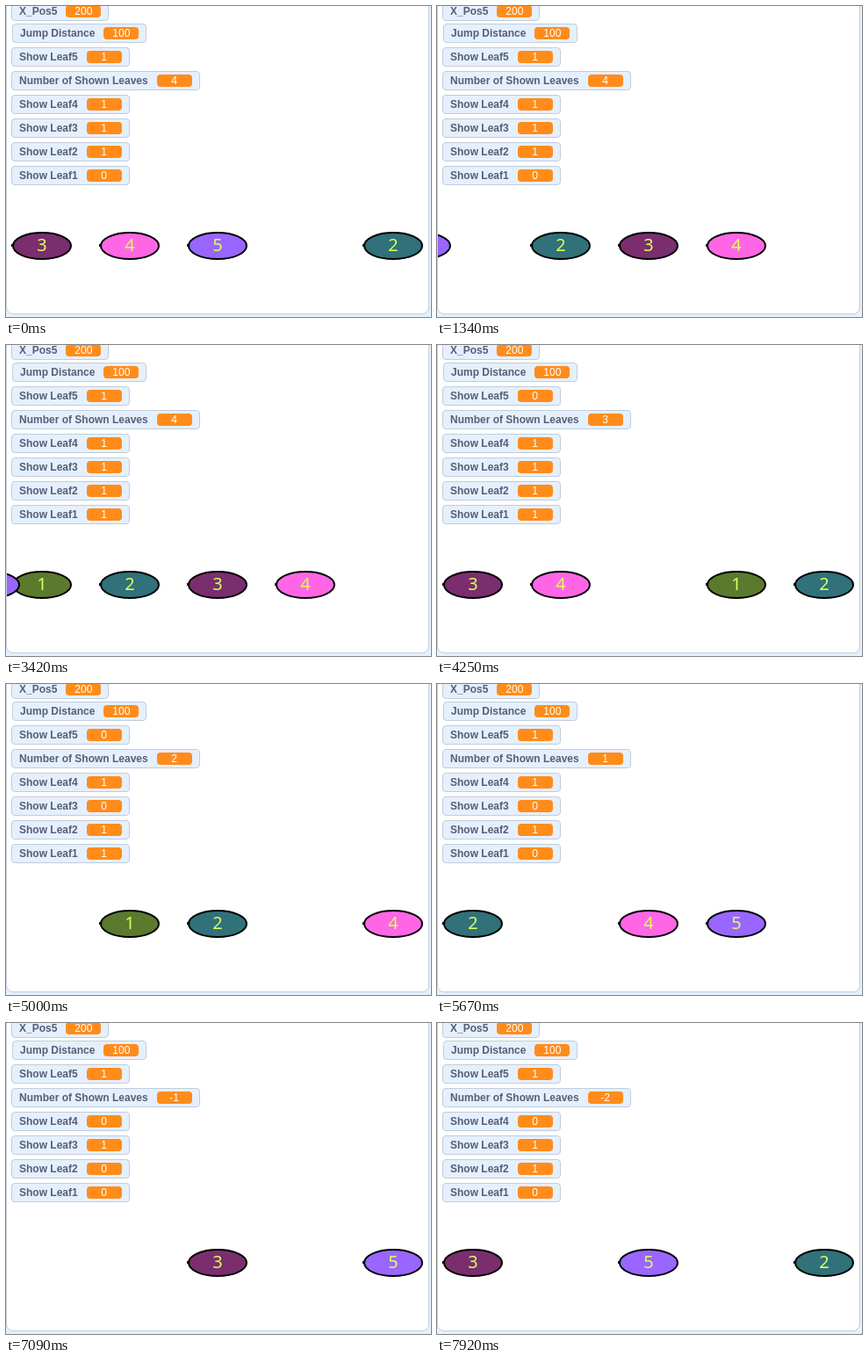
These frames come from a looping animation (484 by 354 pixels, 8000 ms). An HTML page with a canvas:

```html
<!DOCTYPE html>
<html lang="en">
<head>
<meta charset="utf-8">
<title>Leaf carousel</title>
<style>
  html, body { margin: 0; width: 100%; height: 100%; overflow: hidden; background: #e5f0ff; }
  #stage {
    position: absolute; left: 0; top: -11px; width: 480px; height: 360px;
    background: #fff; border: 1px solid #c3ccd9; border-radius: 8px; overflow: hidden;
  }
  canvas { position: absolute; left: 0; top: 0; }
  .monitor {
    position: absolute; display: flex; box-sizing: border-box; height: 22px; padding: 3px;
    background: #e5f0ff; border: 1px solid #c3ccd9; border-radius: 4px;
    font: 12px/14px "Liberation Sans", Arial, sans-serif; white-space: nowrap;
  }
  .label { margin: 0 5px; font-weight: bold; color: #575e75; }
  .value {
    box-sizing: border-box; min-width: 40px; height: 14px; margin: 0 5px; padding: 0 5px;
    border-radius: 4px; background: #ff8c1a; color: #fff; text-align: center;
  }
</style>
</head>
<body>
<div id="stage"><canvas width="480" height="360"></canvas></div>
<script>
const LOOP = 8000;
const LEAVES = 5;
const SPACING = 100;
const FENCE_X = -18;
const COLORS = ['#5b7a2e', '#30717a', '#7a2e6e', '#ff66e6', '#9966ff'];

// Every step moves the row one place left; the leftmost leaf wraps to the right end.
const STEP_TIMES = [500, 920, 1340, 1750, 2170, 2500, 2840, 3420, 3840, 4250,
                    4670, 5000, 5340, 5670, 6000, 6340, 6750, 7090, 7500, 7840];
const SLOW_WRAPS = new Set([3, 7, 8, 20]);       // leaf pauses at the left edge
const HIDING_STEPS = new Set([8, 11, 14, 15, 17, 19]); // wrapped leaf goes hidden
const WRAP_PAUSE = 80;

const stage = document.getElementById('stage');
const ctx = document.querySelector('canvas').getContext('2d');

function addMonitor(label, top, value = '', left = 6) {
  const box = document.createElement('div');
  box.className = 'monitor';
  box.style.left = left - 1 + 'px';
  box.style.top = top + 10 + 'px';
  const name = document.createElement('span');
  name.className = 'label';
  name.textContent = label;
  const field = document.createElement('span');
  field.className = 'value';
  field.textContent = value;
  box.append(name, field);
  stage.append(box);
  return field;
}

addMonitor('X_Pos5', -5, 200);
addMonitor('Jump Distance', 20, 100, 7);
const countField = addMonitor('Number of Shown Leaves', 74);
const leafFields = [182, 155, 128, 101, 47].map((top, i) => addMonitor(`Show Leaf${i + 1}`, top));

const slotOf = (leaf, step) => (leaf + 2 - step + LEAVES * 10) % LEAVES;
const wrappedLeaf = step => (step + 1) % LEAVES + 1;

function stateAt(time) {
  const shown = [0, 1, 1, 1, 1];
  let count = 4, step = 0, waiting = 0;
  while (step < STEP_TIMES.length && time >= STEP_TIMES[step]) {
    const start = STEP_TIMES[step++];
    const leaf = wrappedLeaf(step);
    if (SLOW_WRAPS.has(step) && time < start + WRAP_PAUSE) {
      waiting = leaf;
      break;
    }
    const hides = HIDING_STEPS.has(step);
    shown[leaf - 1] = hides ? 0 : 1;
    if (hides) count--;
  }
  return { shown, count, step, waiting };
}

function drawLeaf(leaf, x) {
  const y = 273;
  ctx.fillStyle = '#000';
  ctx.fillRect(x - 35, y - 2, 2, 3);
  ctx.beginPath();
  ctx.ellipse(x, y, 33, 15, 0, 0, Math.PI * 2);
  ctx.fillStyle = COLORS[leaf - 1];
  ctx.fill();
  ctx.lineWidth = 2;
  ctx.strokeStyle = '#000';
  ctx.stroke();
  ctx.fillStyle = '#d8ff5c';
  ctx.fillText(leaf, x, 279);
}

function setText(field, value) {
  if (field.textContent !== String(value)) field.textContent = value;
}

function render() {
  const { shown, count, step, waiting } = stateAt(performance.now() % LOOP);
  ctx.setTransform(1, 0, 0, 1, 0, 0);
  ctx.clearRect(0, 0, 480, 360);
  ctx.translate(-1, 10);
  ctx.font = '20px "Noto Sans", sans-serif';
  ctx.textAlign = 'center';
  shown.forEach((visible, i) => {
    const leaf = i + 1;
    setText(leafFields[i], visible);
    if (visible) drawLeaf(leaf, leaf === waiting ? FENCE_X : 41 + SPACING * slotOf(leaf, step));
  });
  setText(countField, count);
  requestAnimationFrame(render);
}
render();
</script>
</body>
</html>
```
